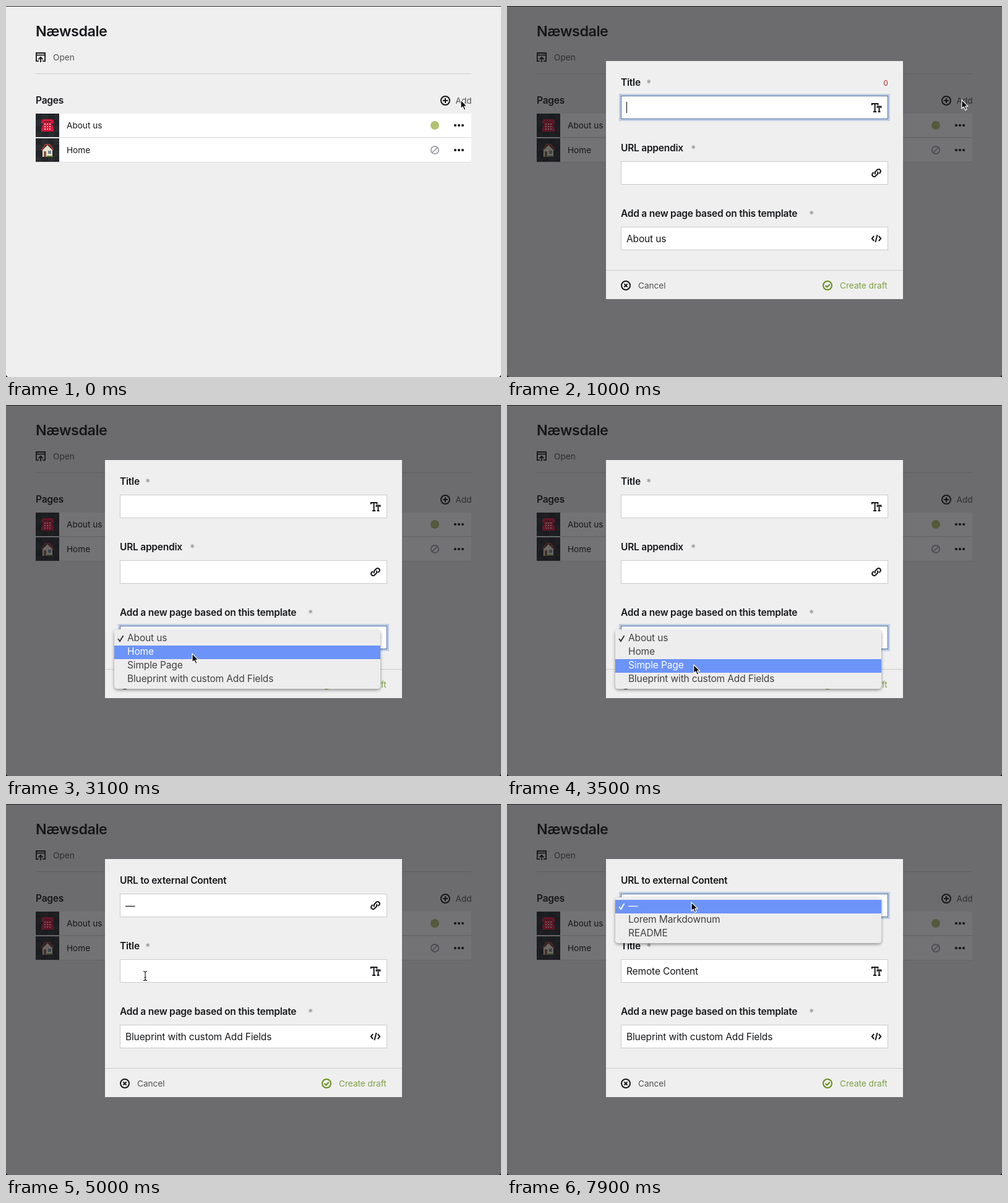
An HTML page that plays this animation: 800x600 px, repeating every 8000 ms.

```html
<!DOCTYPE html>
<html lang="en">
<head>
<meta charset="utf-8">
<title>Add page dialog</title>
<style>
  html, body { margin: 0; width: 100%; height: 100%; overflow: hidden; background: #efefef; }
  svg { display: block; width: 800px; height: 600px; }
  text { font: 400 15.5px Inter, sans-serif; letter-spacing: -.009em; fill: #16171a; white-space: pre; }
  .label { font-weight: 600; letter-spacing: -.015em; }
  .heading { font-size: 23.3px; font-weight: 600; letter-spacing: -.02em; }
  .small { font-size: 13.6px; letter-spacing: 0; }
  .button { fill: #505153; }
  .star { fill: #999; font-weight: 600; }
  .count { font-size: 12px; letter-spacing: 0; font-variant-numeric: tabular-nums; text-anchor: end; }
  .menu text { fill: #414141; }
  .menu .active { fill: #fff; }
  .icon { fill: none; stroke: #16171a; stroke-width: 2; }
</style>
</head>
<body>
<svg viewBox="0 0 800 600">
  <defs>
    <pattern id="checks" width="20" height="20" patternUnits="userSpaceOnUse" x="48" y="174">
      <path fill="#2b2c2f" d="M0 0h20v20H0z"/>
      <path fill="#242528" d="M0 0h10v10H0zM10 10h10v10H10z"/>
    </pattern>
    <filter id="shadow" x="-10%" y="-30%" width="120%" height="170%">
      <feDropShadow dx="0" dy="2" stdDeviation="2.5" flood-opacity=".42"/>
    </filter>
  </defs>
  <g id="page"></g>
  <path fill="#222" d="M0 0h800v1H0zM0 597v3h3zM800 597v3h-3z"/>
  <g id="stage"></g>
</svg>
<script>
const LOOP = 8000;
const OPEN = 1000, TEMPLATE_MENU = 2600, PICK = 4040, SWAP = 4400;
const TITLE_CLICK = 5100, TYPE_FROM = 5150, TYPE_TO = 5450, URL_MENU = 7650;
const BLINK = 530;
const TITLE = 'Remote Content';
const FIELD_TOPS = [145, 251, 357];
const POINTER_PATH = [
  [0, 735, 152], [1300, 735, 152], [2300, 301, 377], [2800, 301, 380], [3050, 301, 402],
  [3300, 301, 404], [3750, 303, 442], [4400, 303, 442], [4900, 226, 279], [5000, 225, 278],
  [5250, 222, 273], [7200, 222, 273], [7600, 298, 159], [8000, 298, 159]
];

const $ = id => document.getElementById(id);
const clamp = v => Math.max(0, Math.min(1, v));
const text = (x, y, str, cls = '') => `<text x="${x}" y="${y}" class="${cls}">${str}</text>`;
const rect = (x, y, w, h, fill, extra = '') =>
  `<rect x="${x}" y="${y}" width="${w}" height="${h}" fill="${fill}" ${extra}/>`;
const icon = (x, y, d, extra = '') =>
  `<path class="icon" transform="translate(${x} ${y})" d="${d}" ${extra}/>`;
const ring = (r) => `M${-r} 0a${r} ${r} 0 1 1 ${2 * r} 0a${r} ${r} 0 1 1 ${-2 * r} 0z`;

const ICONS = {
  open: 'M-3 6.2H-7.1V-7H7.1V6.2H3M-7-3.6H7M0 8V0M-3.6 3.4L0-.2L3.6 3.4',
  add: ring(7) + 'M-4 0H4M0-4V4',
  cancel: ring(7) + 'M-2.6-2.6L2.6 2.6M2.6-2.6L-2.6 2.6',
  check: ring(7) + 'M-3.4 0L-.8 2.6L3.6-2',
  title: 'M-7.2-3.5V-6H2.4V-3.5M-2.4-6V7M-5 7H.2M1.6 1V-1.4H7.4V1M4.5-1.4V7M2.6 7H6.4',
  url: 'M-1.6 2.2A3.2 3.2 0 0 1-1.6-2L2-5.6A3.3 3.3 0 0 1 6.4-1L4.4 1' +
       'M1.6-2.2A3.2 3.2 0 0 1 1.6 2L-2 5.6A3.3 3.3 0 0 1-6.4 1L-4.4-1',
  code: 'M-3.8-4L-7.2 0L-3.8 4M3.8-4L7.2 0L3.8 4M1.6-6L-1.6 6'
};

const phone =
  '<path fill="#d3193c" d="M57 188q0-5 4-5h12q4 0 4 5v2h-4v-3H61v3h-4zM61 188h12l4 10v5H57v-5z"/>' +
  '<path stroke="#f3c5cc" stroke-width="2" stroke-dasharray="2 2" d="M62 191h10M62 195h10M62 199h10"/>';
const house =
  '<path fill="#e9e2cf" d="M59 233l8-8 8 8v11H59z"/>' +
  '<path fill="none" stroke="#a33c35" stroke-width="2" d="M57.5 233l6-9h7l6 9"/>' +
  '<path fill="#8a5a3a" d="M61 235h4v9h-4z"/><path fill="#6f8794" d="M68 234h5v5h-5z"/>' +
  '<path fill="#5d8b3e" d="M66 242h10v2H66z"/>';

function pageRow(y, name, picture, status) {
  const dots = [726, 732, 738].map(x => `<circle cx="${x}" cy="${y + 19}" r="2.1" fill="#16171a"/>`).join('');
  return rect(48, y + 1, 704, 38, '#dedede') + rect(86, y, 666, 38, '#fff') +
    rect(48, y, 38, 38, 'url(#checks)') + picture + text(98, y + 24, name, 'small') + status + dots;
}

$('page').innerHTML = rect(0, 0, 800, 600, '#efefef') +
  text(48, 49, 'Næwsdale', 'heading') +
  icon(56, 83, ICONS.open, 'style="stroke-width:1.8"') + text(76, 88, 'Open', 'small button') +
  rect(48, 109, 704, 1, '#ccc') +
  text(48, 158, 'Pages', 'label') +
  icon(710, 153, ICONS.add) + text(726.5, 158, 'Add', 'small button') +
  pageRow(174, 'About us', phone, '<circle cx="693" cy="193" r="7" fill="#b1c26f"/>') +
  pageRow(214, 'Home', house, icon(693, 233, ring(6.2) + 'M-4 4L4-4', 'style="stroke:#999ca3;stroke-width:1.7"'));

function field(slot, { label, starX, value = '', kind, focused, id = '' }) {
  const y = FIELD_TOPS[slot];
  const glow = focused ? rect(182.5, y - 1.5, 435, 41, 'none', 'stroke="#c0cee2" stroke-width="3"') : '';
  return text(184, y - 16, label, 'label') + (starX ? text(starX, y - 14.5, '*', 'star') : '') + glow +
    rect(184.5, y + .5, 431, 37, '#fff', `stroke="${focused ? '#4b6fa5' : '#ccc'}"`) +
    `<text id="${id}" x="193" y="${y + 25}">${value}</text>` +
    icon(597, y + 19, ICONS[kind]);
}

function counter(slot, n) {
  return `<text class="count" x="616" y="${FIELD_TOPS[slot] - 16}" style="fill:${n ? '#16171a' : '#b3262b'}">${n}</text>`;
}

const caret = (slot, since, t) => Math.floor((t - since) / BLINK) % 2 ? '' :
  rect(193, FIELD_TOPS[slot] + 10, 1, 18, '#000', 'id="caret"');

function menu(top, items, pointerY, opacity = 1) {
  const active = Math.max(0, Math.min(items.length - 1, Math.floor((pointerY - top - 4) / 22)));
  const rows = items.map((item, i) => {
    const y = top + 4 + i * 22, on = i === active;
    return (on ? rect(175, y, 430, 22, '#6c93f8') : '') +
      (i ? '' : `<path d="M181 ${y + 11}l3 4l5.5-9" fill="none" stroke="${on ? '#fff' : '#333'}" stroke-width="1.9"/>`) +
      text(196, y + 15, item, on ? 'active' : '');
  }).join('');
  return `<g class="menu" opacity="${opacity.toFixed(2)}">` +
    rect(175, top, 430, items.length * 22 + 8, '#ededed', 'rx="5" filter="url(#shadow)"') + rows + '</g>';
}

function pointerAt(t) {
  const next = POINTER_PATH.findIndex(p => p[0] > t);
  const [t0, x0, y0] = POINTER_PATH[next - 1], [t1, x1, y1] = POINTER_PATH[next];
  const p = (t - t0) / (t1 - t0), k = p * p * (3 - 2 * p);
  return [x0 + (x1 - x0) * k, y0 + (y1 - y0) * k];
}

function drawPointer(x, y, beam) {
  const d = beam
    ? 'M-3-7.5q3 0 3 2q0-2 3-2M0-6V6M-3 7.5q3 0 3-2q0 2 3 2M-1.5 2.5H1.5'
    : 'M0 0V14L3.2 11L5.6 16.4L8 15.4L5.7 10.2H10z';
  const at = `transform="translate(${x.toFixed(1)} ${y.toFixed(1)})" d="${d}"`;
  return beam
    ? `<path ${at} fill="none" stroke="#fff" stroke-width="2.4"/><path ${at} fill="none" stroke="#111" stroke-width="1.1"/>`
    : `<path ${at} fill="#000" stroke="#fff" stroke-width="1.2" stroke-linejoin="round"/>`;
}

function firstForm(t, y) {
  const selecting = t >= TEMPLATE_MENU;
  const fade = 1 - clamp((t - PICK) / 200);
  return field(0, { label: 'Title', starX: 225, kind: 'title', focused: !selecting }) +
    field(1, { label: 'URL appendix', starX: 297, kind: 'url' }) +
    field(2, { label: 'Add a new page based on this template', starX: 488, value: 'About us', kind: 'code', focused: selecting }) +
    (selecting ? '' : counter(0, 0) + caret(0, OPEN, t)) +
    (selecting && fade > 0
      ? menu(363, ['About us', 'Home', 'Simple Page', 'Blueprint with custom Add Fields'], y, Math.max(fade, .001)) : '');
}

function secondForm(t, y) {
  const choosing = t >= URL_MENU;
  const typing = t >= TITLE_CLICK && !choosing;
  const typed = TITLE.slice(0, Math.round(TITLE.length * clamp((t - TYPE_FROM) / (TYPE_TO - TYPE_FROM))));
  return field(0, { label: 'URL to external Content', value: '—', kind: 'url', focused: choosing }) +
    field(1, { label: 'Title', starX: 225, value: typed, kind: 'title', focused: typing, id: 'typed' }) +
    field(2, { label: 'Add a new page based on this template', starX: 488, value: 'Blueprint with custom Add Fields', kind: 'code' }) +
    (typing ? counter(1, typed.length) + caret(1, Math.min(t, TYPE_TO), t) : '') +
    (choosing ? menu(151, ['—', 'Lorem Markdownum', 'README'], y) : '');
}

function scene(t) {
  const [x, y] = pointerAt(t);
  if (t < OPEN) return drawPointer(x, y, false);
  const first = t < SWAP;
  const inField = slot => x > 184 && x < 616 && y > FIELD_TOPS[slot] && y < FIELD_TOPS[slot] + 38;
  const beam = first ? inField(0) || inField(1) : inField(1);
  return rect(0, 1, 800, 599, '#16171a', 'opacity=".6"') +
    rect(160, 89, 480, 385, '#efefef') + rect(160, 427, 480, 1, '#ccc') +
    icon(192, 452, ICONS.cancel) + text(212, 457, 'Cancel', 'small button') +
    icon(518, 452, ICONS.check, 'style="stroke:#659017"') +
    '<text class="small" x="538" y="457" style="fill:#7da042">Create draft</text>' +
    (first ? firstForm(t, y) : secondForm(t, y)) + drawPointer(x, y, beam);
}

let shown = '';
function frame(now) {
  const markup = scene(now % LOOP);
  if (markup !== shown) {
    $('stage').innerHTML = shown = markup;
    if ($('caret') && $('typed')) $('caret').setAttribute('x', Math.round(193 + $('typed').getComputedTextLength()));
  }
  requestAnimationFrame(frame);
}
requestAnimationFrame(frame);
</script>
</body>
</html>
```
